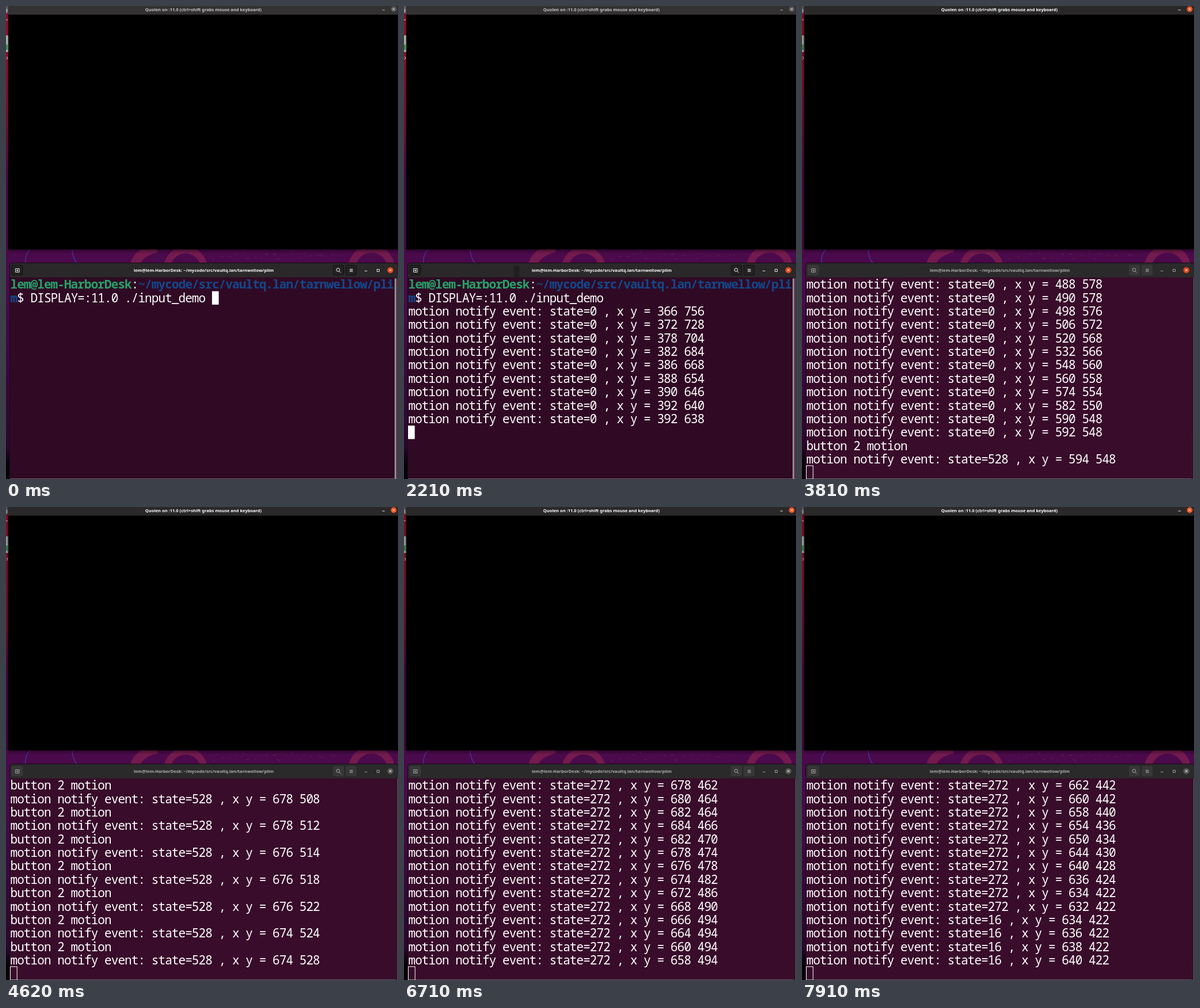
An HTML page that plays this animation: 681 px wide and 822 px high, repeating every 8000 ms.

```html
<!DOCTYPE html>
<html lang="en">
<head>
<meta charset="utf-8">
<title>Motion events</title>
<style>
  html, body { margin: 0; width: 100%; height: 100%; overflow: hidden; background: #4b0a4b; }
  svg { display: block; width: 100vw; height: 100vh; }
  .title { font: 700 7.5px "Noto Sans", sans-serif; text-anchor: middle; }
  .row {
    font: 21px "Noto Sans Mono", monospace;
    letter-spacing: calc(11.68px - .6em);
    white-space: pre;
    fill: #fff;
  }
  .user { font-weight: 700; fill: #26a269; }
  .path { font-weight: 700; fill: #12488b; }
  .line { fill: none; stroke: #fff; }
  #display, #terminal { --bar: #2a2829; --ink: #fff; --button: #232122; --edge: #111; }
  #display.idle { --bar: #333132; --ink: #c9c5c2; }
  #terminal.idle { --bar: #2b2a2b; --ink: #b0adab; --button: #383738; --edge: #383738; }
  .bar { fill: var(--bar); }
  .title { fill: var(--ink); }
  .button { fill: var(--button); stroke: var(--edge); }
  .icon { fill: none; stroke: var(--ink); }
</style>
</head>
<body>
<svg viewBox="0 0 681 822" preserveAspectRatio="none">
  <defs>
    <linearGradient id="wall" x1="0" y1="0" x2="0" y2="1">
      <stop offset="0" stop-color="#a50f2c"/>
      <stop offset=".12" stop-color="#98102f"/>
      <stop offset=".25" stop-color="#7c0f38"/>
      <stop offset=".36" stop-color="#4b0a4d"/>
      <stop offset=".6" stop-color="#480a4a"/>
      <stop offset=".93" stop-color="#2b0630"/>
      <stop offset=".97" stop-color="#050106"/>
    </linearGradient>
    <linearGradient id="shade" x1="0" y1="0" x2="0" y2="1">
      <stop offset="0" stop-opacity=".4"/>
      <stop offset="1" stop-opacity="0"/>
    </linearGradient>
    <linearGradient id="sideShade">
      <stop offset="0" stop-opacity=".1"/>
      <stop offset="1" stop-opacity=".5"/>
    </linearGradient>
  </defs>

  <!-- desktop -->
  <rect width="8" height="822" fill="url(#wall)"/>
  <rect width="4" height="13" fill="#6b6568"/>
  <path d="M1.5 5v6M0 24h3M1 88l2 2-2 3" class="line"/>
  <rect y="51" width="4" height="29" fill="#b9bfb9"/>
  <rect y="67" width="3" height="9" fill="#3d9a4d"/>
  <rect id="side" width="4" height="423" fill="url(#sideShade)"/>
  <rect x="4" y="422" width="677" height="30" fill="#4b0a4b"/>
  <g fill="none" stroke="#731a4e">
    <path d="M224 449Q230 428 262 420" stroke-width="16"/>
    <circle cx="312" cy="456" r="32" stroke-width="12"/>
    <circle cx="635" cy="456" r="34" stroke-width="13"/>
    <g id="dashes" stroke="#702250"></g>
  </g>
  <path d="M34 447Q32 433 42 423M115 423Q115 436 123 447" fill="none" stroke="#46309a" stroke-width="1.5"/>
  <rect x="4" y="423" width="677" height="7" fill="url(#shade)"/>

  <!-- display window -->
  <g id="display">
    <rect class="bar" x="4" width="677" height="15"/>
    <rect x="4" y="15" width="677" height="408"/>
    <text class="title" x="343" y="8.6">Quolen on :11.0 (ctrl+shift grabs mouse and keyboard)</text>
    <path class="icon" d="M653.500 7h4.500" stroke-width=".9"/>
    <circle id="displayClose" cx="673.5" cy="5.500" r="5"/>
    <path class="line" d="M671.500 3.500l4 4m0-4l-4 4"/>
  </g>

  <!-- terminal window -->
  <g id="terminal">
    <path d="M6 822V452q0-6 6-6h664q5 0 5 5v371z" fill="#160a15"/>
    <path class="bar" d="M7 472V452q0-5 5-5h664q4 0 5 4v21z"/>
    <rect id="body" x="7" y="471.500" width="674" height="351"/>
    <path d="M7 821.500h673.500V472" fill="none" stroke="#6a5b66"/>
    <rect class="button" x="10" y="450.500" width="19" height="17" rx="2"/>
    <rect class="button" x="568.500" y="450.500" width="18" height="17" rx="2"/>
    <rect class="button" x="590.500" y="450.500" width="18" height="17" rx="2"/>
    <path class="icon" stroke-width=".9" d="M16.500 462.500v-6h6.500v6zM18 459.500h3.500m-1.750-1.700v3.400M579 461l2.500 2.500M597 457.500h5.500m-5.500 2h5.500m-5.500 2h5.500M623 460.500h4.500M644.500 457.500h4v4h-4z"/>
    <circle class="icon" cx="576.800" cy="458.500" r="2.800"/>
    <text class="title" x="343.500" y="461.800">lem@lem-HarborDesk: ~/mycode/src/vaultq.lan/tarnwellow/plim</text>
    <circle id="terminalClose" cx="667.700" cy="459" r="5.300"/>
    <path class="line" d="M665.700 457l4 4m0-4l-4 4"/>
    <rect id="thumb" width="3.500" rx="1.700"/>
    <g id="rows"></g>
    <rect id="cursor" width="11.700" height="23.300" stroke="#fff"/>
    <rect id="pointer" x="191" width="9.500" height="19" fill="#201e1f"/>
  </g>
</svg>

<script>
const LOOP = 8000, ENTER = 430, FOCUS_SWAP = 3690, CLOSE_DIMS = 4080;
const BLINK_START = 540, BLINK = 600;
const POINTER_START = 1820, POINTER_STEP = 120;
const REFRESH = 130;
const LEFT = 7.5, TOP = 472.3, PITCH = 11.68, LINE = 23.36, FULL_ROWS = 14;
const $ = id => document.getElementById(id);

const linear = k => k;
const easeOut = k => 1 - (1 - k) ** 2;
const smooth = k => k * k * (3 - 2 * k);

// Terminal log: the mouse wanders from point to point, always on even coordinates.
const log = [
  '<tspan class="user">lem@lem-HarborDesk</tspan>:<tspan class="path">~/mycode/src/vaultq.lan/tarnwellow/pli</tspan>',
  '<tspan class="path">m</tspan>$ DISPLAY=:11.0 ./input_demo'
];
let mouse = [366, 756];

function move(state, count, x, y, ease = linear) {
  const from = mouse;
  for (let i = 1; i <= count; i++) {
    const k = ease(i / count);
    mouse = [x, y].map((to, axis) => 2 * Math.round((from[axis] + (to - from[axis]) * k) / 2));
    if (state === 528) log.push('button 2 motion');
    log.push(`motion notify event: state=${state} , x y = ${mouse.join(' ')}`);
  }
}

move(0, 1, 366, 756);
move(0, 8, 392, 638, easeOut);
move(0, 41, 488, 578);
move(0, 11, 592, 548, smooth);
move(528, 1, 594, 548);
move(528, 10, 678, 508);
move(528, 6, 674, 528);
move(528, 21, 642, 466);
move(528, 4, 636, 458);
move(16, 14, 672, 456, k => k * (.8 + .2 * k));
move(272, 3, 678, 462);
move(272, 3, 684, 466);
move(272, 7, 666, 494);
move(272, 3, 658, 494);
move(272, 15, 636, 468);
move(272, 16, 662, 442);
move(272, 9, 632, 422, smooth);
move(16, 4, 640, 422);

// Spells of mouse activity; each refresh prints a steady number of lines.
const spells = [
  { start: 0, refreshes: 0, lines: 2, rate: 0 },
  { start: 2210, refreshes: 7, lines: 11, rate: 6 },
  { start: 3540, refreshes: 18, lines: 54, rate: 5.4 },
  { start: 6440, refreshes: 9, lines: 167, rate: 5 },
  { start: 7910, refreshes: 0, lines: log.length, rate: 0 }
];

function linesAt(t) {
  const { start, refreshes, lines, rate } = spells.findLast(spell => spell.start <= t);
  if (!rate) return lines;
  const done = Math.min(refreshes, Math.floor((t - start) / REFRESH));
  return 2 * Math.round((lines + rate * done - 1) / 2) + 1;
}

function set(id, attributes) {
  for (const name in attributes) $(id).setAttribute(name, attributes[name]);
}

// Short strokes scattered over the wallpaper
let seed = 7;
const random = () => (seed = seed * 16807 % 2147483647) / 2147483647;
for (let i = 0; i < 20; i++) {
  const x = 362 + i * 11 + random() * 6, y = 427 + random() * 15;
  const dx = random() * 14 - 7, dy = random() * 8 - 4;
  $('dashes').innerHTML += `<path d="M${x} ${y}q${dx} 0 ${dx} ${dy}"/>`;
}

for (let i = 0; i < FULL_ROWS; i++) {
  $('rows').innerHTML += `<text class="row" x="${LEFT}" y="${TOP + i * LINE + 19}"></text>`;
}
const rows = [...$('rows').children];
let shownCount;

function drawRows(top, count) {
  if (count === shownCount) return;
  shownCount = count;
  rows.forEach((row, i) => row.innerHTML = top + i < count ? log[top + i] : '');
}

function draw(t) {
  const count = linesAt(t);
  const top = Math.max(0, count - FULL_ROWS);
  const swapped = t >= FOCUS_SWAP;
  drawRows(top, count);

  $('display').classList.toggle('idle', !swapped);
  $('terminal').classList.toggle('idle', swapped);
  set('side', { opacity: swapped ? 1 : 0.5 });
  set('displayClose', { fill: swapped ? '#e95420' : '#555354' });
  set('terminalClose', { fill: t < CLOSE_DIMS ? '#e0461b' : '#555354' });
  set('body', { fill: swapped ? '#380c2a' : '#300a24' });

  const thumbHeight = Math.max(30, 349 * 15 / (top + 15));
  set('thumb', {
    x: swapped ? 676 : 675,
    y: 822 - thumbHeight,
    height: thumbHeight,
    fill: swapped ? '#301526' : '#8d878b'
  });

  const typing = t < ENTER;
  const lit = typing || Math.floor((t - BLINK_START) / BLINK) % 2 === 0;
  const inset = swapped ? 0.5 : 0;
  set('cursor', {
    x: typing ? LEFT + 30 * PITCH : LEFT - 0.5 + inset,
    y: TOP + (typing ? 1 : Math.min(count, FULL_ROWS)) * LINE - inset,
    fill: swapped ? 'none' : '#fff',
    'stroke-width': swapped ? 1 : 0,
    visibility: swapped || lit ? 'visible' : 'hidden'
  });

  const pointerSteps = Math.floor((t - POINTER_START) / POINTER_STEP);
  set('pointer', {
    y: 546 - 47 * Math.min(2, pointerSteps),
    visibility: pointerSteps >= 0 && !swapped ? 'visible' : 'hidden'
  });
}

const start = performance.now();
function tick() {
  draw((performance.now() - start) % LOOP);
  requestAnimationFrame(tick);
}
tick();
</script>
</body>
</html>
```
